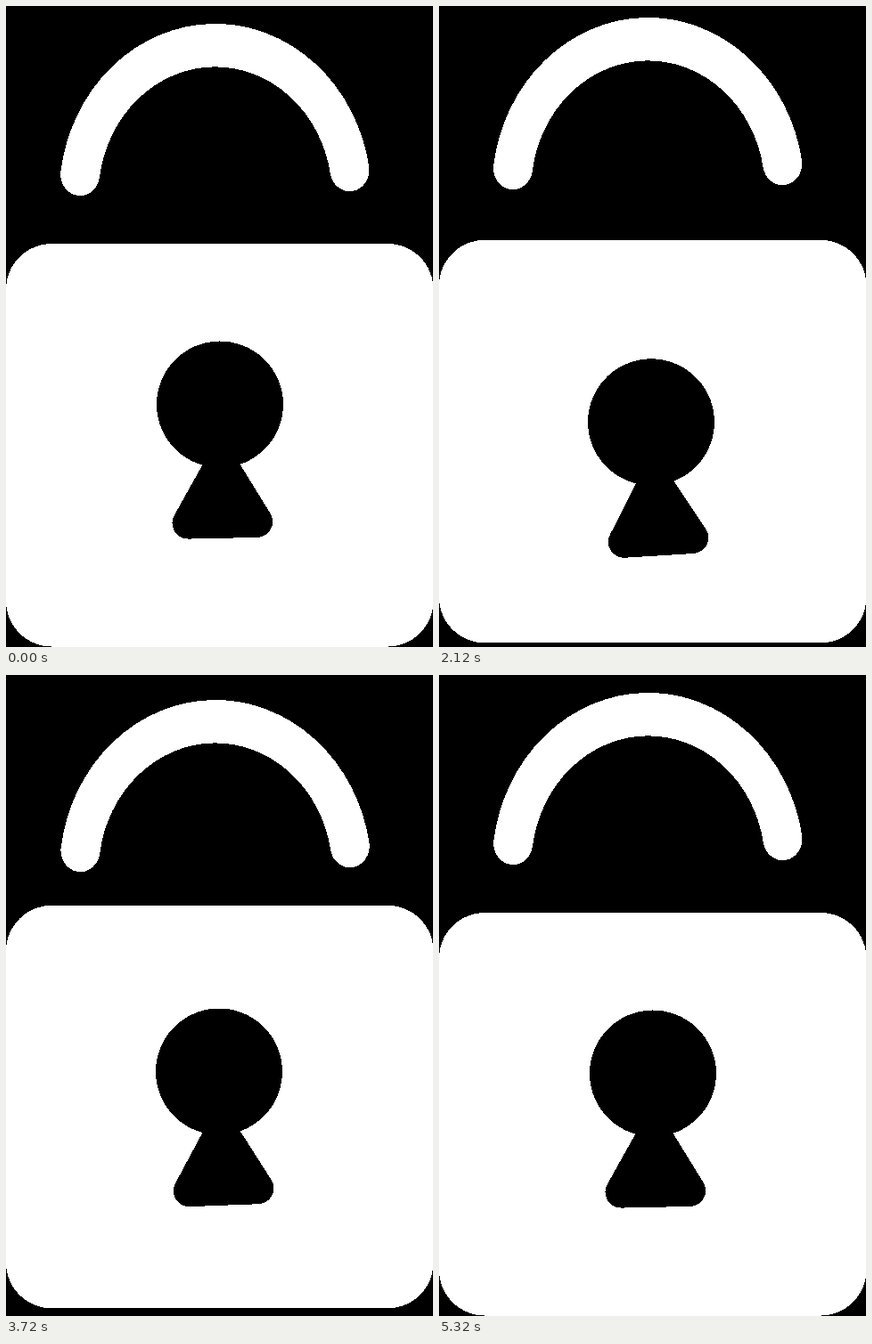
Recreate the animation shown at these times as an HTML page. Size 479 by 720 pixels, loop 5.76 s.

```html
<!DOCTYPE html>
<html lang="en">
<head>
<meta charset="utf-8">
<title>Padlock</title>
<style>
  html, body { margin: 0; width: 100%; height: 100%; overflow: hidden; background: #000; }
  svg { display: block; width: 100vw; height: 100vh; }
</style>
</head>
<body>
<svg viewBox="0 0 479 720" shape-rendering="crispEdges">
  <rect width="479" height="720" fill="#000"/>
  <g id="shackle">
    <path transform="translate(234.7 212.5) scale(1 1.1)" d="M-151.5 -21.4 A153 153 0 0 1 150.8 -25.9"
      fill="none" stroke="#fff" stroke-width="44" stroke-linecap="round"/>
  </g>
  <g id="body">
    <rect y="267" width="479.5" height="452.55" rx="51.5" fill="#fff"/>
    <g id="keyhole">
      <circle r="71"/>
      <path d="M0 66.8 L38.5 132.5 H-38.5 Z" stroke="#000" stroke-width="35.6" stroke-linejoin="round"/>
    </g>
  </g>
</svg>
<script>
const LOOP = 5760, STEP = 40, END = 5320;

// The body hops at an even pace, quick up and slower down.
const HOP = { first: 130, every: 860, count: 6, time: 370, height: 8.7 };

// The shackle hangs low and springs up around each of these times.
const springs = [858, 1420, 1979, 2797, 4015, 4647];
const SAG = 9, LIFT = 26, REACH = 333;

const REST = [240, 447.5, -1.2];
// time, then x, y and angle of the keyhole
const poses = [
  [300, ...REST],
  [800, 284, 429.5, -6],
  [2120, 238, 471.5, -3.5],
  [2920, 241, 442.5, 0.3],
  [3720, 239, 453.7, -2.2],
  [4600, ...REST]
];

const get = id => document.getElementById(id);
const shackle = get("shackle"), body = get("body"), keyhole = get("keyhole");

function ease(p) {
  const c = Math.min(1, Math.max(0, p));
  return c * c * (3 - 2 * c);
}

function bodyY(t) {
  const n = Math.floor((t - HOP.first) / HOP.every);
  const p = (t - HOP.first - n * HOP.every) / HOP.time;
  if (n < 0 || n >= HOP.count || p >= 1) return 0;
  return -HOP.height * Math.sin(Math.PI * p ** 0.55);
}

function shackleY(t) {
  const sag = SAG * ease(t / 300) * ease((END - t) / 340);
  const near = Math.min(...springs.map(s => Math.abs(t - s)));
  return sag - LIFT * ease(1 - near / REACH);
}

function keyholePose(t) {
  const i = poses.findIndex(p => p[0] > t);
  if (i < 1) return REST;
  const [t0, ...a] = poses[i - 1], [t1, ...b] = poses[i];
  const e = ease((t - t0) / (t1 - t0));
  return a.map((v, n) => v + (b[n] - v) * e);
}

function draw(t) {
  const dy = shackleY(t);
  const [x, y, angle] = keyholePose(t);
  shackle.setAttribute("transform", `translate(${dy * 0.03} ${dy})`);
  body.setAttribute("transform", `translate(0 ${bodyY(t)})`);
  keyhole.setAttribute("transform", `translate(${x} ${y}) rotate(${angle})`);
}

const begin = performance.now();
function tick() {
  const t = (performance.now() - begin) % LOOP;
  draw(Math.floor(t / STEP) * STEP);
  requestAnimationFrame(tick);
}
draw(0);
requestAnimationFrame(tick);
</script>
</body>
</html>
```
